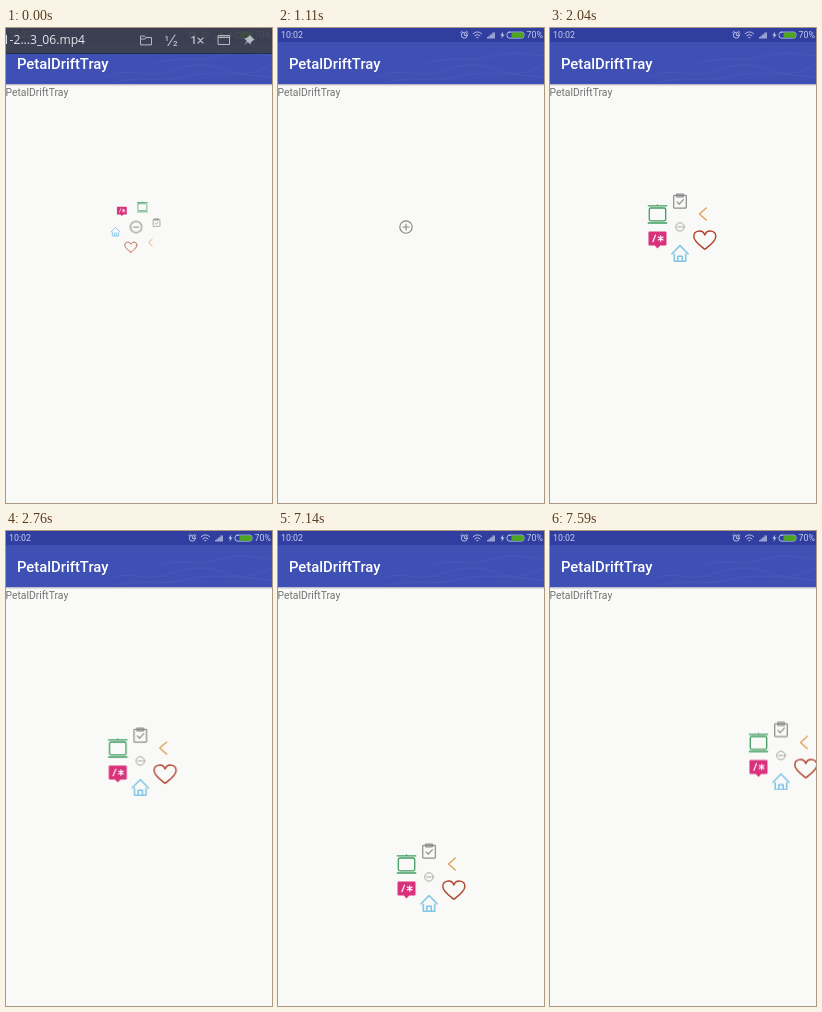
Recreate the animation shown at these times as an HTML page. Size 266 by 475 pixels, loop 8 s.

```html
<!DOCTYPE html>
<html lang="en">
<head>
<meta charset="utf-8">
<title>Radial menu</title>
<style>
  @property --turn { syntax: "<angle>"; inherits: true; initial-value: 0deg; }
  @property --r { syntax: "<length>"; inherits: true; initial-value: 26px; }
  @property --size { syntax: "<number>"; inherits: true; initial-value: 1; }

  html, body { margin: 0; height: 100%; overflow: hidden; background: #f9f9f7; }
  svg { display: block; width: 100vw; height: 100vh; }
  text { font-family: Roboto, "Noto Sans", sans-serif; }
  .line { fill: none; stroke-linecap: round; stroke-linejoin: round; }

  /* Ring position, icon size and hub size follow different curves. */
  .menu {
    --decel: cubic-bezier(.333, .667, .667, 1);
    animation: drag 8s infinite, orbit 8s infinite, grow 8s linear infinite;
  }
  .icon {
    transform: rotate(calc(var(--a) + var(--turn))) translate(var(--r))
      rotate(calc(-1 * (var(--a) + var(--turn)))) scale(var(--size));
  }
  .hub { animation: hub 8s infinite; }
  .plus { animation: plus 8s step-end infinite; }
  .player { animation: slide 8s linear infinite; }

  @keyframes drag {
    0%, 32.25% { transform: translate(130px, 199px); animation-timing-function: ease-in-out; }
    39.375%, 88.875% { transform: translate(150.5px, 346.5px); animation-timing-function: linear; }
    89.25% { transform: translate(151px, 346px); animation-timing-function: ease-in-out; }
    92.5% { transform: translate(212px, 42px); animation-timing-function: ease-in-out; }
    94.875%, 100% { transform: translate(231px, 224.5px); }
  }
  @keyframes orbit {
    0% { --turn: 78deg; --r: 21px; animation-timing-function: var(--decel); }
    1.875%, 9.75% { --turn: 0deg; --r: 26px; animation-timing-function: var(--decel); }
    13.875%, 21.375% { --turn: 360deg; --r: 0px; animation-timing-function: var(--decel); }
    25.5%, 100% { --turn: 0deg; --r: 26px; }
  }
  @keyframes grow {
    0% { --size: .545; }
    1.875%, 9.75% { --size: 1; }
    13.875%, 21.375% { --size: 0; }
    25.5%, 100% { --size: 1; }
  }
  @keyframes hub {
    0% { transform: translate(0, 0) scale(.92); }
    1.875%, 9.75% { transform: translate(0, 0) scale(.68); animation-timing-function: cubic-bezier(.333, .667, .667, 1); }
    13.875%, 21.375% { transform: translate(-2px, 0) scale(1); animation-timing-function: cubic-bezier(.333, 0, .667, .333); }
    25.5%, 100% { transform: translate(0, 0) scale(.68); }
  }
  @keyframes plus {
    0% { opacity: 0; }
    9.75% { opacity: 1; }
    21.375%, 100% { opacity: 0; }
  }
  @keyframes slide {
    0%, 9.37% { transform: translateY(0); }
    9.375% { transform: translateY(-5px); }
    11.25%, 100% { transform: translateY(-27px); }
  }
</style>
</head>
<body>
<svg viewBox="0 0 266 475" preserveAspectRatio="none">
  <defs>
    <linearGradient id="shade" x2="0" y2="1">
      <stop stop-color="#555b80" stop-opacity=".5"/>
      <stop offset="1" stop-color="#888" stop-opacity="0"/>
    </linearGradient>
  </defs>
  <rect width="266" height="475" fill="#f9f9f7"/>

  <!-- App bar -->
  <rect y="56" width="266" height="2.5" fill="url(#shade)"/>
  <rect y="13" width="266" height="43" fill="#3e50b4"/>
  <g class="line" stroke="#8390d4" stroke-width=".6" opacity=".2">
    <path d="M100 49C122 38 140 51 160 44S196 34 216 41 246 46 266 37"/>
    <path d="M112 54C136 47 154 55 178 49S222 45 266 49"/>
    <path d="M150 35C172 27 190 35 210 29S246 25 266 28"/>
  </g>
  <text x="11" y="41" font-size="14.8" font-weight="500" fill="#fff">PetalDriftTray</text>
  <text x="-.5" y="67.6" font-size="10.35" fill="#747474">PetalDriftTray</text>

  <!-- Status bar -->
  <rect width="266" height="14" fill="#2f3e9f"/>
  <g fill="#c6cceb" font-size="8.8">
    <text x="3" y="10.3">10:02</text>
    <text x="248.5" y="10.3">70%</text>
    <path d="M209 10.5V9H210.5V7.7H212.3V6.2H214.3V4.5H217V10.5Z" opacity=".7"/>
    <path d="M225.3 3.5L222.3 7.5H224.3L223.3 10.8 226.6 6.5H224.6Z"/>
  </g>
  <g class="line" stroke="#c6cceb" stroke-width=".9">
    <circle cx="186.3" cy="7.2" r="3"/>
    <path d="M186.3 5.5V7.4H188M182.7 4.5L184.2 3.2M188.4 3.2L189.9 4.5"/>
    <path d="M195.2 5.6Q199.4 2 203.6 5.6M196.8 7.6Q199.4 5.2 202 7.6M198.8 9.6H200"/>
    <rect x="229" y="4.1" width="17" height="6" rx="2.3"/>
  </g>
  <rect x="233.5" y="4.4" width="12.2" height="5.4" rx="1.5" fill="#4ea61e"/>

  <!-- Radial menu -->
  <g class="menu">
    <g class="icon line" style="--a: -90deg" stroke="#8d8d8d" stroke-width="1.25">
      <rect x="-6.3" y="-5.7" width="12.6" height="12.7" rx=".8"/>
      <path d="M-3.3 -5.7V-7H3.3V-4.2H-3.3ZM-3 .9L-.7 3.2 3.4 -1.3"/>
    </g>
    <g class="icon line" style="--a: -30deg" stroke="#e0a055" stroke-width="1.4">
      <path d="M3.7 -6L-3 0 3.7 6"/>
    </g>
    <g class="icon line" style="--a: 30deg" stroke="#ae402b" stroke-width="1.4">
      <path d="M2.3 9.3C-2 5.7 -8.7 1.5 -8.7 -3.5C-8.7 -9.8 0 -11 2.3 -5C4.6 -11 13.3 -9.8 13.3 -3.5C13.3 1.5 6.6 5.7 2.3 9.3Z"/>
    </g>
    <g class="icon line" style="--a: 90deg" stroke="#82c5e6" stroke-width="1.6">
      <path d="M-8 .8L0 -7.5 8 .8M-5.7 1.2V8.2H5.7V1.2M-2.2 8.2V3.2H2.2V8.2"/>
    </g>
    <g class="icon" style="--a: 150deg">
      <path d="M-8 -8.5H8Q9 -8.5 9 -7.5V4.500Q9 5.500 8 5.500H2.700L0 8.500 -2.700 5.500H-8Q-9 5.500 -9 4.500V-7.500Q-9 -8.500 -8 -8.500Z" fill="#d9317c"/>
      <path class="line" d="M-4.600 1.700L-2 -4.900M3.200 -4.200V1.200M.8 -2.900L5.600 -.1M5.600 -2.900L.8 -.1" stroke="#fff" stroke-width="1.200"/>
    </g>
    <g class="icon line" style="--a: 210deg" stroke="#3f9c60" stroke-width="1.3">
      <path d="M-9.200 -8.200H9.200M-9.200 9H9.200M0 -9.200V-8.800"/>
      <rect x="-8.200" y="-6" width="16.400" height="12.800" rx="1.500"/>
    </g>
    <g class="hub line" stroke="#888" stroke-width="1.15">
      <circle r="6.2"/>
      <path d="M-3 0H3"/>
      <path class="plus" d="M0 -3V3"/>
    </g>
  </g>

  <!-- Player strip -->
  <g class="player">
    <rect width="266" height="25" fill="#3c4149" fill-opacity=".9"/>
    <rect y="25" width="266" height="1" fill="#262d4a"/>
    <g fill="#e4e6ec">
      <text x="79" y="16.3" font-size="12.1" text-anchor="end" style="font-family: 'Open Sans', 'Noto Sans', sans-serif">1-2...3_06.mp4</text>
      <g font-size="8" font-weight="500" fill="#c4c7cf">
        <text x="158.5" y="12.5">1</text>
        <text x="167" y="17.5">2</text>
        <text x="184.5" y="16.3" font-size="11">1</text>
      </g>
    </g>
    <path d="M243.8 7L248.500 11.700 247 12.500 244.800 14.500 244.500 16.500 241.700 13.900 238.500 17.300 240.900 13.100 238.300 10.500 240.500 10.100 242.900 8.200Z" fill="#b5b8c0"/>
    <g class="line" stroke="#b5b8c0">
      <path d="M134.500 16.500V8H138.500L140 9.500H145.500V16.500ZM134.500 11H139L140.300 9.500"/>
      <path d="M169 7L162 17.500M192 10L197 15M197 10L192 15" stroke-width="1.200"/>
      <path d="M212.500 7.500H223.500V16.500H212.500ZM212.500 9.500H223.500M215 7.500V9.500M218 7.500V9.500M221 7.500V9.500"/>
    </g>
  </g>
</svg>
</body>
</html>
```
